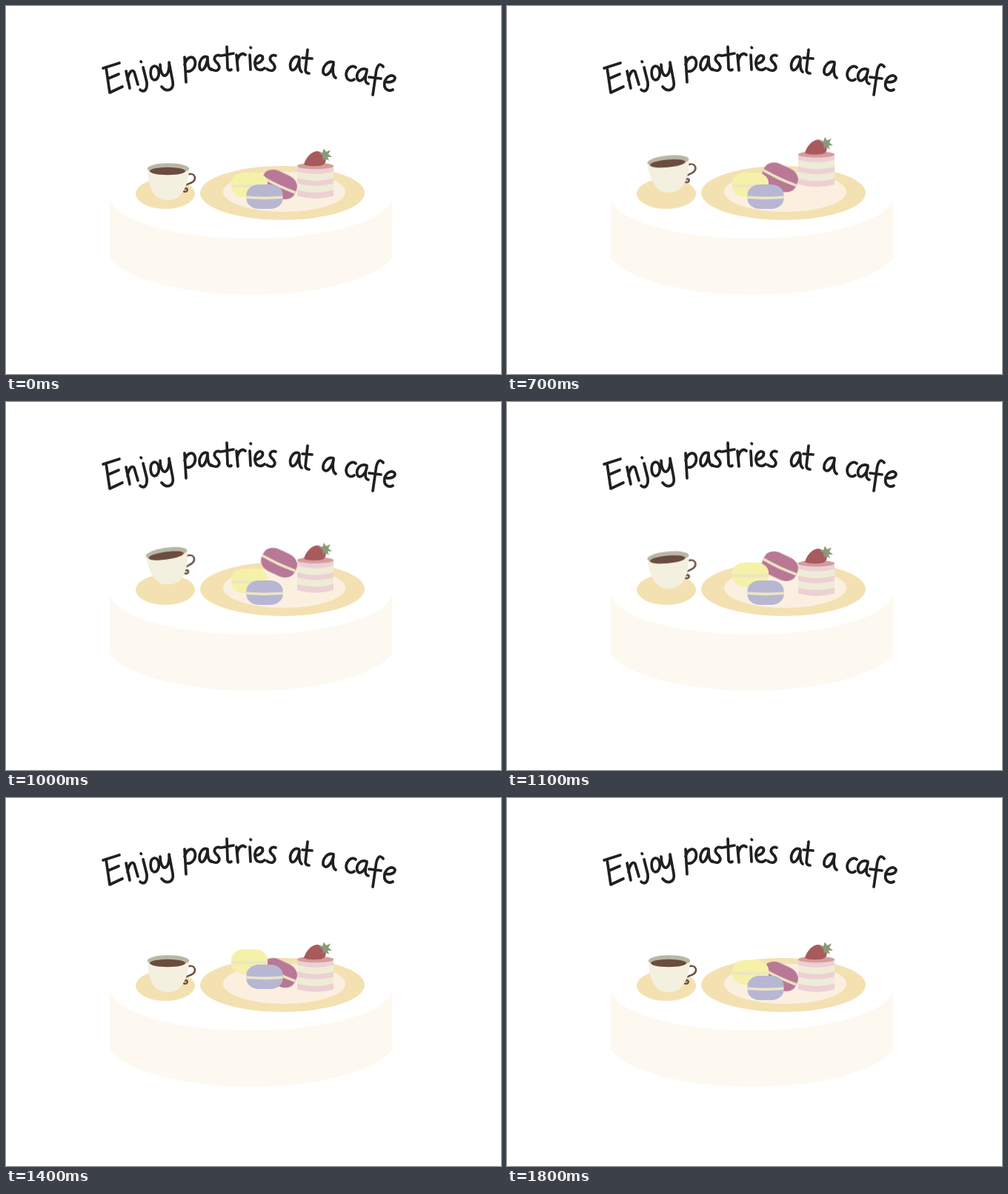
Write an HTML page without scripts that moves like this. It is 668 px wide and 497 px high and loops after 1.9 s.

```html
<!DOCTYPE html>
<html lang="en">
<head>
<meta charset="utf-8">
<title>Cafe pastries</title>
<style>
  html, body { margin: 0; width: 100%; height: 100%; overflow: hidden; background: #fff; }
  svg { display: block; width: 100%; height: 100%; }

  .lettering { fill: none; stroke: #211f20; stroke-width: 3.7; stroke-linecap: round; stroke-linejoin: round; }
  .plate { fill: #f4e1b2; }
  .filling { fill: none; stroke: #ece5c4; stroke-width: 3.6; }
  .hop { animation: 1.9s step-end infinite; }

  .cake { animation-name: cake; }
  .cup { animation-name: cup; transform-origin: 219px 237px; }
  .berry { animation-name: berry; }
  .lemon { animation-name: lemon; }
  .violet { animation-name: violet; }

  @keyframes cake {
    0% { transform: none; }
    26.31% { transform: translateY(-9px); }
    31.57% { transform: translateY(-20px); animation-timing-function: steps(5); }
    57.89%, 100% { transform: translateY(2px); }
  }
  @keyframes cup {
    0% { transform: translateY(0) rotate(0deg); }
    26.31% { transform: translateY(0) rotate(0deg); animation-timing-function: steps(4); }
    47.36% { transform: translateY(-21px) rotate(-10.7deg); animation-timing-function: steps(4); }
    68.42%, 100% { transform: translateY(0) rotate(0deg); }
  }
  @keyframes berry {
    0% { transform: translateY(0); }
    26.31% { transform: translateY(0); animation-timing-function: steps(5); }
    52.63% { transform: translateY(-24px); animation-timing-function: steps(5); }
    78.94%, 100% { transform: translateY(0); }
  }
  @keyframes lemon {
    0% { transform: translateY(0); }
    52.63% { transform: translateY(0); animation-timing-function: steps(3); }
    68.42% { transform: translateY(-25px); animation-timing-function: steps(3); }
    84.21% { transform: translateY(-12px); animation-timing-function: steps(2); }
    94.73%, 100% { transform: translateY(-6px); }
  }
  @keyframes violet {
    0% { transform: translateY(0); }
    63.15% { transform: translateY(0); animation-timing-function: steps(4); }
    84.21% { transform: translateY(-32px); animation-timing-function: steps(2); }
    94.73%, 100% { transform: translateY(-1px); }
  }
</style>
</head>
<body>
<svg viewBox="0 0 668 497">
  <defs>
    <g id="macaron">
      <rect x="-24.5" y="-16.5" width="49" height="33" rx="17" ry="13.5"/>
      <path class="filling" d="M-24.3 .8Q0 3 24.3 .8"/>
    </g>
    <path id="layer" d="M393 0Q417.5 7 442 0V9Q417.5 16 393 9Z"/>
  </defs>

  <!-- hand lettering -->
  <g class="lettering" role="img" aria-label="Enjoy pastries at a cafe">
    <path d="M131 84L153 77M135 83L140 117L157 109M138 98L152 92"/>
    <path d="M162 88L167 111M164 100C165 91 170 84 173 89L178 106"/>
    <path d="M185 83L190 103C191 113 186 118 181 113M182 75L182.5 75.5"/>
    <path d="M200 81C193 83 194 98 200 100C208 100 209 81 200 81Z"/>
    <path d="M208 79C208 88 211 95 215 94C219 92 221 84 220 76L225 102C227 114 217 117 210 109"/>
    <path d="M241 69L243 103M241 79C244 68 253 66 255 74C257 83 250 90 243 88"/>
    <path d="M272 69C264 66 259 78 262 85C265 90 271 82 272 70C272 78 273 85 277 86"/>
    <path id="s" d="M289 67C283 65 279 70 283 75C288 79 290 84 285 87Q280 88 277 85"/>
    <path d="M298 55L299 84Q300 88 304 86M291 67L307 64"/>
    <path d="M311 66L313 87M312 75C313 67 318 62 323 66"/>
    <path d="M329 66L330 86M330 56L330.5 56.5"/>
    <path d="M336 78C343 77 348 73 346 68C342 64 335 70 336 79C337 87 344 88 349 84"/>
    <use href="#s" x="75"/>
    <path d="M395 69C388 66 382 76 384 84C387 91 394 83 396 71C395 79 396 87 399 89"/>
    <path d="M407 59L404 87Q405 91 409 91M400 70L413 71"/>
    <path d="M442 76C434 73 427 82 428 90C431 97 439 91 442 78C440 86 441 95 445 97"/>
    <path d="M472 83C466 78 459 86 459 93C460 101 466 102 470 99"/>
    <path d="M487 86C479 82 472 90 474 98C477 105 485 98 487 88C484 96 484 104 489 105"/>
    <path d="M509 82C504 75 500 82 499 92L495 120M490 96L506 98"/>
    <path d="M511 102C518 104 525 102 525 97C523 91 513 94 511 103C509 112 516 116 522 113"/>
  </g>

  <!-- tablecloth -->
  <path fill="#fdf8f0" d="M140 257A190.5 57 0 0 0 521 257V340A196 65 0 0 1 140 340Z"/>

  <ellipse class="plate" cx="215" cy="253.5" rx="40" ry="20.5"/>
  <ellipse class="plate" cx="373" cy="252.5" rx="111" ry="36.5"/>
  <ellipse fill="#fbf0e0" cx="375.5" cy="251" rx="82.5" ry="27"/>

  <g class="hop cup">
    <path fill="none" stroke="#6b5040" stroke-width="2.5" stroke-linecap="round" d="M243 230C245 226 254 225 255 232C255 239 247 239 240 243C235 247 240 253 244 250C246 247 243 245 241 247"/>
    <path fill="#f4f0e0" d="M191 218C191 238 196 252 205 259Q216 265 230 260C241 252 247 238 247 218Z"/>
    <ellipse fill="#b9b7a4" cx="219" cy="219.7" rx="28" ry="7.5"/>
    <ellipse fill="#6b4c40" cx="218" cy="223" rx="24" ry="5.2"/>
  </g>

  <g class="hop berry"><use href="#macaron" fill="#b87896" transform="translate(368.5 241) rotate(25)"/></g>
  <g class="hop lemon"><use href="#macaron" fill="#f5f1a8" x="328.5" y="241.5"/></g>
  <g class="hop violet"><use href="#macaron" fill="#b7b7d3" x="349" y="257.5"/></g>

  <g class="hop cake">
    <g fill="#edd0d3">
      <use href="#layer" y="215"/>
      <use href="#layer" y="232"/>
      <use href="#layer" y="247.5"/>
    </g>
    <g fill="#eeecd6">
      <use href="#layer" y="223.5"/>
      <use href="#layer" y="239.5"/>
    </g>
    <ellipse fill="#d39d9c" cx="417.5" cy="216" rx="24.5" ry="4.3"/>
    <path fill="#a85a5c" d="M402 214C404 206 412 196 420 196C428 197 434 204 431 211Q430 216 420 216Q408 217 402 214Z"/>
    <path fill="#8a9a78" d="M422 198L427 198L429 192.5L432 197L438 194.5L435 200L440 204L434 204L436 209L430 206L428 209L427 202Z"/>
  </g>
</svg>
</body>
</html>
```
